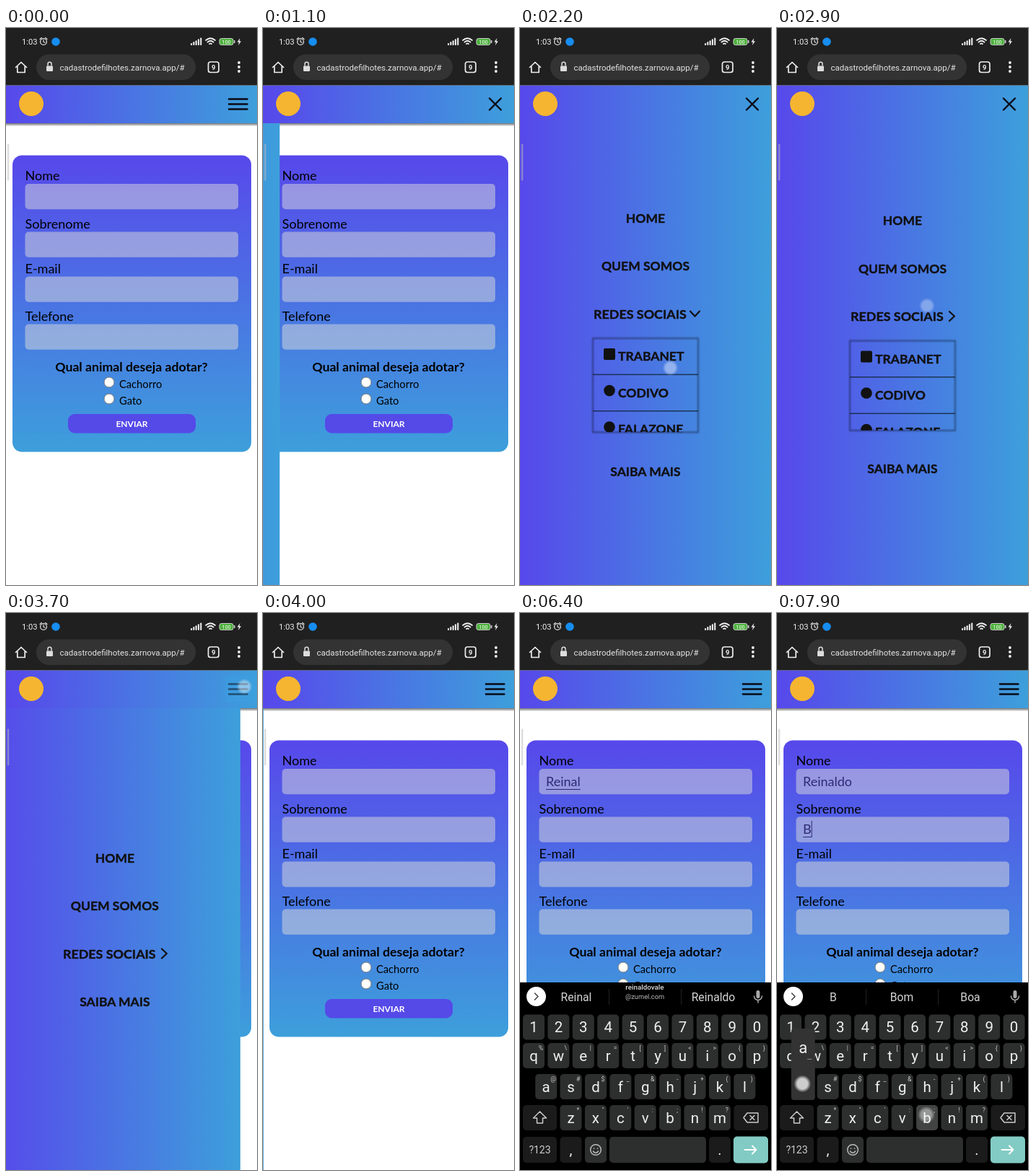
These frames come from a looping animation (348 by 772 pixels, 8 s). An HTML page:

```html
<!DOCTYPE html>
<html lang="pt">
<head>
<meta charset="utf-8">
<title>Formulário de adoção</title>
<style>
  html, body { margin: 0; width: 100%; height: 100%; overflow: hidden; background: #fff; }
  svg { display: block; width: 348px; height: 772px; font-family: Roboto, sans-serif; }
  .page { font-family: Lato, sans-serif; }
  .mid { text-anchor: middle; }
  .bold { font-weight: 700; }
  .heavy { font-weight: 700; fill: #111; stroke: #111; stroke-width: .4; }
  .line { fill: none; stroke-linecap: round; stroke-linejoin: round; }
</style>
</head>
<body>
<svg viewBox="0 0 348 772">
  <defs>
    <linearGradient id="across"><stop stop-color="#5748eb"/><stop offset="1" stop-color="#3d9fdb"/></linearGradient>
    <linearGradient id="down" x2="0" y2="1"><stop stop-color="#5748eb"/><stop offset="1" stop-color="#3d9fdb"/></linearGradient>
    <linearGradient id="shade" x2="0" y2="1"><stop stop-opacity=".55"/><stop offset="1" stop-opacity="0"/></linearGradient>
    <radialGradient id="glow"><stop offset=".6" stop-color="#fff" stop-opacity=".75"/><stop offset="1" stop-color="#fff" stop-opacity="0"/></radialGradient>
    <filter id="soft" x="-10%" y="-10%" width="120%" height="120%"><feGaussianBlur stdDeviation="1"/></filter>
  </defs>
  <g id="stage"></g>
</svg>
<script>
const LOOP = 8000;
const stage = document.getElementById('stage');
const pen = document.createElement('canvas').getContext('2d');
pen.font = '18px Lato, sans-serif';

const clamp = x => Math.max(0, Math.min(1, x));
const within = (t, from, to) => t >= from && t < to;
const escapeText = s => s.replace(/&/g, '&amp;').replace(/</g, '&lt;');
const text = (x, y, size, str, attrs = '') =>
  `<text x="${x}" y="${y}" font-size="${size}" ${attrs}>${escapeText(str)}</text>`;
const label = (x, y, size, str, fill) => text(x, y + size * .355, size, str, `class="mid" fill="${fill}"`);
const rect = (x, y, w, h, fill, r = 0, attrs = '') =>
  `<rect x="${x}" y="${y}" width="${w}" height="${h}" rx="${r}" fill="${fill}" ${attrs}/>`;
const circle = (x, y, r, fill, attrs = '') => `<circle cx="${x}" cy="${y}" r="${r}" fill="${fill}" ${attrs}/>`;
const line = (d, color, width, attrs = '') =>
  `<path class="line" d="${d}" stroke="${color}" stroke-width="${width}" ${attrs}/>`;

// The CSS "ease" curve: cubic-bezier(.25, .1, .25, 1)
function ease(x) {
  let lo = 0, hi = 1, u = .5;
  for (let i = 0; i < 20; i++) {
    u = (lo + hi) / 2;
    const bx = .75 * u * (1 - u) + u ** 3;
    if (bx < x) lo = u; else hi = u;
  }
  return .3 * u * (1 - u) ** 2 + 3 * u * u * (1 - u) + u ** 3;
}
const ramp = (t, start) => ease(clamp((t - start) / 350));
const pulse = (t, open, close) => ramp(t, open) - ramp(t, close);

// ---- Browser bar ----
const chrome = rect(0, 0, 348, 79.5, '#202020') +
  text(22, 23, 11.2, '1:03', 'fill="#eee"') +
  circle(52, 19, 4.4, 'none', 'stroke="#ddd" stroke-width="1.3"') +
  line('M52 16.5V19.3L54 20.3M47 15.5l2.3-2M57 15.5l-2.3-2', '#ddd', 1.2) +
  circle(69, 19, 5.8, '#168df0') +
  [0, 1, 2, 3, 4].map(i => rect(256 + i * 3.3, 21 - i * 1.9, 2.1, 3 + i * 1.9, '#eee', 1)).join('') +
  line('M277 17Q283.5 11.5 290 17M279.4 19.6Q283.5 16 287.6 19.6M282 22Q283.5 20.8 285 22', '#eee', 1.8) +
  rect(296, 14.5, 19, 9, '#4cb13c', 2.5, 'stroke="#ccc"') + rect(316, 17, 1.5, 4, '#ccc') +
  label(305.5, 19, 7.5, '100', '#fff') +
  '<path d="M324.5 14l-4 5.5h2.5l-1 4.5 4-5.7h-2.5z" fill="#eee"/>' +
  line('M13.5 54.5L21 47.5l7.5 7M15.8 53V61.5H26.2V53', '#eee', 1.7) +
  rect(42, 36.5, 221, 35.5, '#333', 17.75) +
  rect(56, 52.5, 9, 7.5, '#ddd', 1) + line('M58 52v-2.3a2.5 2.5 0 0 1 5 0V52', '#ddd', 1.5) +
  text(74.5, 58.5, 11.5, 'cadastrodefilhotes.zarnova.app/#', 'fill="#e4e4e4"') +
  rect(280.5, 47, 14.5, 14.5, 'none', 3, 'stroke="#eee" stroke-width="1.7"') +
  text(287.8, 58, 9.5, '9', 'class="mid bold" fill="#eee"') +
  [48, 54, 60].map(y => circle(323, y, 1.9, '#eee')).join('');

// ---- Form ----
const fields = [['Nome', 216], ['Sobrenome', 282.5], ['E-mail', 344.5], ['Telefone', 410.5]];
const form = rect(0, 79, 348, 693, '#fff') + rect(9, 176.5, 331, 411, 'url(#down)', 13) +
  fields.map(([name, y]) => text(26.5, y - 4.7, 18, name) +
    rect(26.5, y, 295.5, 35.3, '#dcdcdc', 5, 'fill-opacity=".5"')).join('') +
  text(174, 475.5, 17.7, 'Qual animal deseja adotar?', 'class="mid bold"') +
  [['Cachorro', 491], ['Gato', 514]].map(([name, y]) =>
    circle(143, y, 7, '#fff', 'stroke="#777" stroke-width="1"') + text(157, y + 8, 14.7, name)).join('') +
  rect(86, 535, 177, 26.5, '#5549e8', 9) + text(174.5, 552.5, 12, 'ENVIAR', 'class="mid bold" fill="#fff"');

// ---- Menu ----
function menu(slide, open, chevronDown) {
  const shift = 88 * open, height = 151 * open;
  const item = (y, name) => text(174, y, 17.5, name, 'class="mid heavy"');
  const top = 506 - shift;
  const list = ['TRABANET', 'CODIVO', 'FALAZONE'].map((name, i) => {
    const y = top + i * 50.5;
    const icon = i ? circle(124, y + 22, 7.8, '#111') : rect(116, y + 14, 16, 16, '#111', 2);
    return icon + text(136, y + 31, 17.5, name, 'class="heavy"') +
      (i ? rect(101, y - 1, 146, 1.5, '#123', 0, 'fill-opacity=".8"') : '');
  }).join('');
  const dropdown = open < .01 ? '' :
    rect(101, top, 146, height, 'none', 0, 'stroke="#000" stroke-opacity=".55" stroke-width="1.5" filter="url(#soft)"') +
    `<clipPath id="fold">${rect(101, top, 146, height, '#000')}</clipPath><g clip-path="url(#fold)">${list}</g>`;
  return `<g transform="translate(${348 * (slide - 1)})">` + rect(0, 132, 348, 640, 'url(#across)') +
    item(345.5 - shift, 'HOME') + item(412 - shift, 'QUEM SOMOS') +
    text(102, 478.5 - shift, 17.9, 'REDES SOCIAIS', 'class="heavy"') +
    line('M-3.5-6.5L3.5 0L-3.5 6.5', '#111', 2.2,
      `transform="translate(242.5 ${472 - shift}) rotate(${chevronDown ? 90 : 0})"`) +
    dropdown + item(545 + shift, 'SAIBA MAIS') + '</g>';
}

function header(isOpen) {
  return rect(0, 79.5, 348, 52.5, 'url(#across)') + circle(35, 105, 17, '#f6b530') +
    line(isOpen ? 'M314 97.5l16 16M330 97.5l-16 16' : 'M309 98.5h25.5M309 105.5h25.5M309 112.5h25.5', '#0a0a14', 2.4);
}

// ---- Keyboard ----
const rows = [
  ['1234567890', '', 574, 19],
  ['qwertyuiop', '%\\|=[]<>{}', 613.5, 19],
  ['asdfghjkl', '@#$_&-+()', 656.5, 36.2],
  ['zxcvbnm', '*"\':;!?', 699.5, 70.5]
];
const keys = rows.flatMap(([chars, hints, y, x]) =>
  [...chars].map((char, i) => ({ char, hint: hints[i] || '', x: x + i * 34.4, y })));

const NAME = 'Reinaldo';
const presses = [['r', 5000], ['e', 5180], ['i', 5340], ['n', 5500], ['a', 5640], ['l', 5810], ['b', 7600], ['a', 7850]]
  .map(([char, at]) => ({ at, ...keys.find(k => k.char === char) }));
const COMMIT = 80, PICK = 6830, NEXT_FIELD = 7250;

function typing(t) {
  const done = presses.filter(p => t >= p.at + COMMIT);
  const first = done.slice(0, 6).length;
  const picked = t >= PICK, second = t >= NEXT_FIELD, surname = done.length > 6 ? 'B' : '';
  const edits = [4450, PICK, NEXT_FIELD, ...presses.map(p => p.at + COMMIT)].filter(at => t >= at);
  return {
    name: picked ? NAME : NAME.slice(0, first), surname, picked, second,
    upper: second ? !surname : !first,
    caret: edits.length > 0 && Math.floor((t - Math.max(...edits)) / 500) % 2 === 0
  };
}

function typedText({ name, surname, picked, second, caret }) {
  const value = (str, y, underlined, active) => {
    const end = 36 + pen.measureText(str).width;
    return text(36, y, 18, str, 'fill="#2d2a70"') +
      (underlined && str ? rect(36, y + 4, end - 36, 1, '#2d2a70') : '') +
      (active && caret ? rect(end, y - 18, 1, 23, '#2d2a70') : '');
  };
  return value(name, 240, !picked, !second) + value(surname, 306, true, second);
}

function toolbar({ name, picked, second, upper }) {
  const grey = '#9b9b9b';
  const mic = rect(327.5, 523, 5, 11, '#aaa', 2.5) + line('M324.5 531a5.5 5.5 0 0 0 11 0M330 537v3', '#aaa', 1.5);
  const toggle = circle(22.5, 531.5, 13.5, '#fff') +
    line(upper ? 'M24.5 527l-4.5 4.5 4.5 4.5' : 'M20.5 527l4.5 4.5-4.5 4.5', '#444', 1.6);
  if (upper) return toggle + mic +
    line('M62 525.5h13v8l-4.5 4.5H62zM75 533.5h-4.5V538M65.5 532q2 3 4.5 0M66 529v.2M71 529v.2', grey, 1.6) +
    text(117.5, 536, 12, 'GIF', `class="mid bold" fill="${grey}"`) +
    circle(168, 532, 4.4, 'none', `stroke="${grey}" stroke-width="3.6"`) +
    circle(168, 532, 6.8, 'none', `stroke="${grey}" stroke-width="2" stroke-dasharray="3 2.34"`) +
    rect(211.5, 525.5, 13, 13, grey, 1.5) + rect(248, 522, 1, 20, '#222') +
    [274, 280, 286].map(x => circle(x, 532, 1.7, grey)).join('');
  const words = second ? ['B', 'Bom', 'Boa'] : picked ? ['da', 'e', 'de'] :
    name.length < 4 ? [name, 'Rei', 'Reino'] : [name, '', NAME];
  return toggle + mic + [123, 223].map(x => rect(x, 521, 1, 22, '#222')).join('') +
    words.map((w, i) => label(78 + i * 95, 532, 15.7, w, '#d4d4d4')).join('') +
    (words[1] ? '' : text(173, 522, 9.8, 'reinaldovale', 'class="mid" font-weight="500" fill="#ddd"') +
      text(173, 534.5, 9.3, '@zumel.com', 'class="mid" fill="#bbb"'));
}

function keyboard(t, state) {
  const rise = 1 - (1 - clamp((t - 4450) / 350)) ** 3;
  if (!rise) return '';
  const show = c => state.upper ? c.toUpperCase() : c;
  const white = '#f0f0f0', dark = '#1b1b1b', grey = '#2d2e2e';
  const caps = keys.map(k => rect(k.x - 15, k.y - 17.5, 30, 35, grey, 5) +
    label(k.x, k.y, 20.5, show(k.char), white) + label(k.x + 10, k.y - 10.5, 8.8, k.hint, '#c8c8c8')).join('');
  const extras = rect(4, 682, 47, 35, dark, 5) + rect(296.5, 682, 47.5, 35, dark, 5) +
    `<path class="line" d="M27.5 691l-9 9h5v7h8v-7h5z" stroke="#ccc" stroke-width="1.5" style="fill:${state.upper ? '#ccc' : 'none'}"/>` +
    line('M315 693h15v13h-15l-5-6.5zM319 696.5l6 6M325 696.5l-6 6', '#ccc', 1.5) +
    rect(4, 726, 47, 36, dark, 5) + label(27.5, 744, 14, '?123', '#ccc') +
    rect(55.5, 726, 30, 36, dark, 5) + label(70.5, 744, 20, ',', white) +
    rect(90, 726, 30, 36, grey, 5) + circle(105, 744, 7.3, 'none', 'stroke="#bbb" stroke-width="1.5"') +
    line('M102.5 742v.2M107.5 742v.2M101.5 746q3.5 4.5 7 0', '#bbb', 1.6) +
    rect(124, 726, 134, 36, grey, 5) + rect(262, 726, 30, 36, dark, 5) + label(277, 744, 20, '.', white) +
    rect(296, 725.5, 48, 37, '#82cbc4', 5) + line('M311.5 744h16M322 738.5l5.5 5.5-5.5 5.5', '#fff', 1.9);
  const pressed = presses.map(p => {
    const age = t - p.at;
    if (age < 0 || age > 380) return '';
    const popup = age > 150 ? rect(p.x - 15, p.y - 17.5, 30, 35, '#fff', 5, 'fill-opacity=".1"') :
      rect(p.x - 16.5, p.y - 80.5, 33, 99, '#333', 4) + label(p.x, p.y - 54, 22, show(p.char), white) +
      label(p.x + 9, p.y - 41, 10, '…', white);
    return popup + circle(p.x - 1, p.y - 4, 12, 'url(#glow)', `opacity="${clamp((480 - age) / 300)}"`);
  }).join('');
  return (t > 4650 ? rect(0, 512, 348, 260, '#fff') : '') +
    `<g transform="translate(0 ${260 * (1 - rise)})">` + rect(0, 512, 348, 260, '#000') +
    toolbar(state) + caps + extras + pressed + '</g>';
}

// ---- Touches: x, y, from, to ----
const touches = [
  [324, 103, 800, 1100], [208.5, 471, 1700, 2320], [208, 385, 2700, 2980], [330.5, 102, 3590, 3850],
  [150, 234, 4300, 4500], [268, 532, 6700, 6900], [150, 300, 7200, 7400]
];
const fingers = t => touches.filter(([, , a, b]) => within(t, a, b)).map(([x, y, , b]) =>
  circle(x, y, 11, 'url(#glow)', `opacity="${.55 * clamp((b - t) / 100)}"`)).join('');

function draw(t) {
  const opening = 1073, closing = 3673;
  const state = typing(t);
  const tapped = within(t, 850, 1100) || within(t, 3600, 3850);
  return '<g class="page">' + form + typedText(state) + rect(0, 132, 348, 4.5, 'url(#shade)') +
    menu(pulse(t, opening, closing), pulse(t, 2002, 2850), within(t, 2002, 2850)) +
    header(within(t, opening, closing)) + '</g>' +
    (tapped ? rect(304, 87, 44, 36, '#3d9fe0', 0, 'fill-opacity=".45"') : '') +
    rect(1.8, 160.5, 2.5, 51, '#bbb', 1.2, 'fill-opacity=".5"') + chrome + keyboard(t, state) + fingers(t);
}

let shown = '';
function tick(now) {
  const markup = draw(now % LOOP);
  if (markup !== shown) stage.innerHTML = shown = markup;
  requestAnimationFrame(tick);
}
requestAnimationFrame(tick);
</script>
</body>
</html>
```
